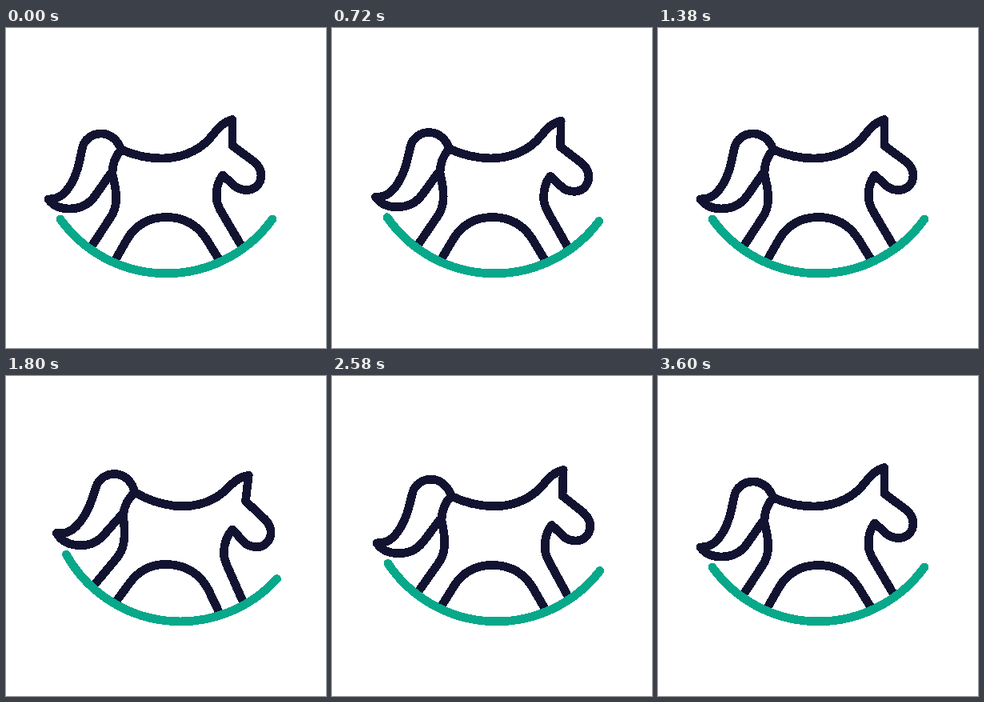
These frames come from a looping animation (400 px wide and 400 px high, 3630 ms). An HTML page:

```html
<!DOCTYPE html>
<html lang="en">
<head>
<meta charset="utf-8">
<title>Rocking horse</title>
<style>
  html, body { margin: 0; width: 100%; height: 100%; overflow: hidden; background: #fff; }
  svg { display: block; width: 100%; height: 100%; }
  path {
    fill: none; stroke: #121331; stroke-width: 10.7;
    stroke-linecap: round; stroke-linejoin: round; shape-rendering: crispEdges;
  }
  .rocker { stroke: #08a88a; }
</style>
</head>
<body>
<svg viewBox="0 0 400 400">
  <g id="toy">
    <!-- tail -->
    <path d="M144 152C140 140 130 132 119 132C108 132 98 139 95.500 150C92 166 90 180 82 194C74 208 66 214 53 214C59 222 68 226 79 226C91.500 226 100.500 222.500 108 214C114.500 206.500 121 195.500 131 182"/>
    <!-- back, head, chest and front leg -->
    <path d="M144 152C160 159 176 163 195 163C217 163 238 155 252 141C262 131 267 119 283 114.500V147L310 167C316 172 319 177 319 184C319 195 311 202.500 301 202.500C295 202.500 290 201 286 197.500L271 184C264 193 262.500 204 263.500 215C264.500 221 267 226 270 231L294.500 272.500"/>
    <!-- rump and hind leg -->
    <path d="M144 152C136 161 133 171 133 182C135 193 139 202 137.500 218C137 226 134 232 130 238L107 273"/>
    <!-- inner legs -->
    <path d="M137 289.500L151 265C162 246 179 236.500 201 236.500C222 236.500 238 245 250 263L266.500 289.500"/>
    <path class="rocker" d="M68 239A163.300 163.300 0 0 0 333 239"/>
  </g>
</svg>
<script>
const LOOP = 3630, STEP = 30;
const toy = document.getElementById('toy');

// [step, tilt in degrees]: a swing that dies away
const swing = [[0, 0], [17, 10.1], [34.7, -20], [54, 10.1], [71.5, -5.9], [92, 3.4], [108, -1.2], [120, 0]];

// cubic-bezier(.5, 0, .5, 1)
function ease(x) {
  let low = 0, high = 1;
  for (let i = 0; i < 24; i++) {
    const s = (low + high) / 2;
    if (1.5 * s * (1 - s) + s ** 3 < x) low = s; else high = s;
  }
  return low * low * (3 - 2 * low);
}

function tiltAt(step) {
  const next = Math.max(1, swing.findIndex(key => key[0] >= step));
  const [t0, a] = swing[next - 1], [t1, b] = swing[next];
  return a + (b - a) * ease((step - t0) / (t1 - t0));
}

function draw(now) {
  const tilt = tiltAt(Math.floor(now % LOOP / STEP));
  const x = 200.4 + 2.68 * tilt - 0.003 * tilt * tilt;
  toy.setAttribute('transform', `translate(${x} 143) rotate(${tilt}) translate(-200.5 -143)`);
  requestAnimationFrame(draw);
}
draw(0);
</script>
</body>
</html>
```
